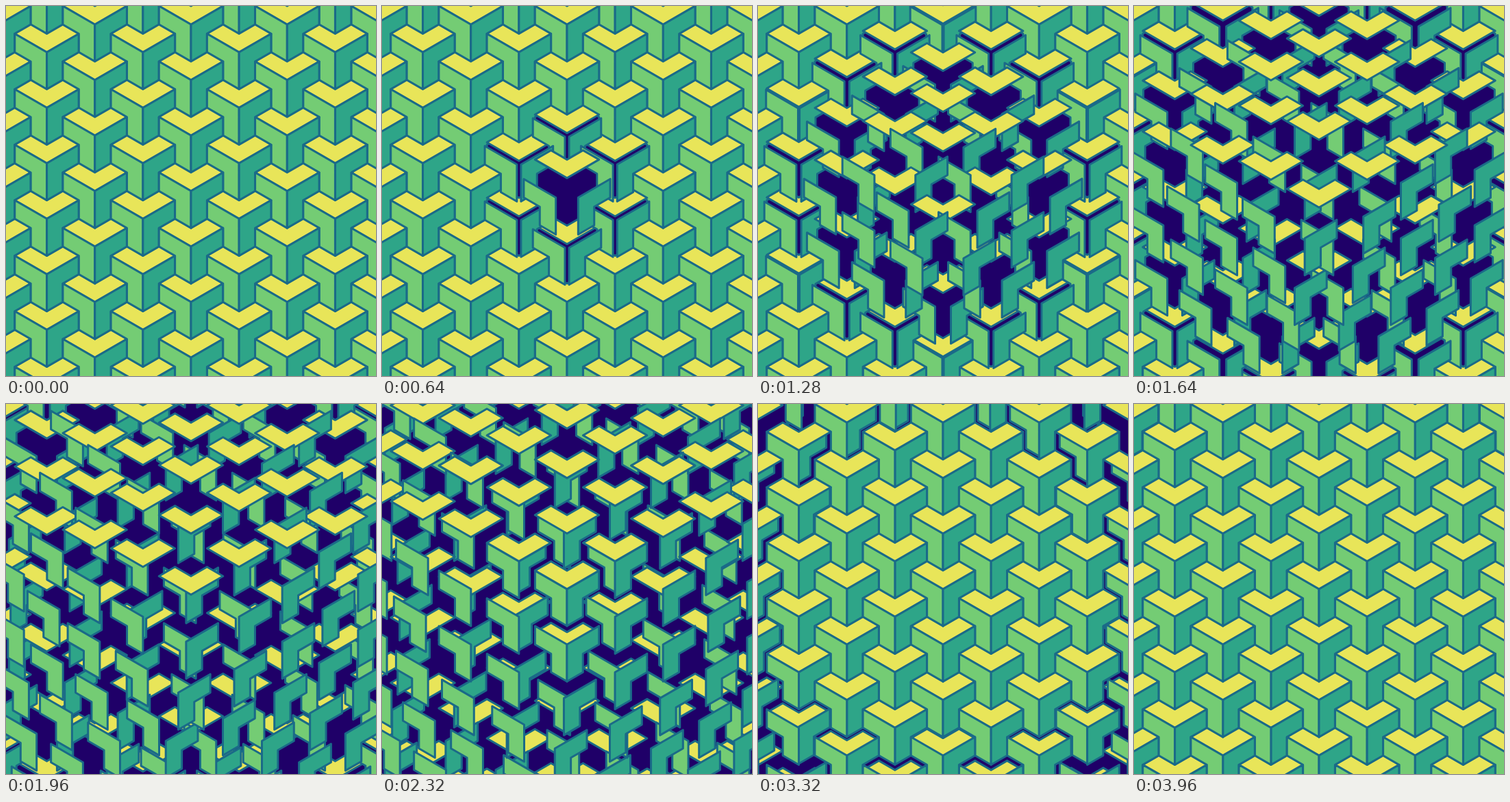
Animation, 540 px wide and 540 px high, one loop 4000 ms. Source, as an HTML page with a canvas:

```html
<!DOCTYPE html>
<html lang="en">
<head>
<meta charset="utf-8">
<title>Exploding cubes</title>
<style>
  html, body { margin: 0; width: 100%; height: 100%; overflow: hidden; background: #1f0068; }
  canvas { display: block; }
</style>
</head>
<body>
<canvas id="stage" width="540" height="540"></canvas>
<script>
const ctx = document.getElementById('stage').getContext('2d');
const LOOP = 4000, TRAVEL_TIME = 2000;
const UNIT = 27, STEP = 3 * UNIT;
const DELAY_PER_PX = 375 / STEP;
const COS30 = Math.sqrt(3) / 2;

// Each face is the same chevron, turned by thirds of a circle.
const FACES = [
  { color: '#e8e559', angle: 0 },
  { color: '#74cc74', angle: -2 * Math.PI / 3 },
  { color: '#2ea588', angle: 2 * Math.PI / 3 },
];

const chevron = new Path2D();
[[0, 0], [-2, -1], [-1, -1.5], [0, -1], [1, -1.5], [2, -1]].forEach(([x, y]) =>
  chevron.lineTo(x * COS30 * UNIT, y * UNIT));
chevron.closePath();

const pieces = [];
for (let col = -6; col <= 6; col++) {
  for (let row = -11; row <= 11; row++) {
    if ((col + row) % 2) continue;
    const x = col * STEP * COS30, y = row * STEP / 2;
    const distance = Math.hypot(x, y);
    FACES.forEach((face, type) => {
      const isTop = type === 0;
      const layer = isTop ? row - 2 : row + type * 0.1;
      const sink = isTop && row >= 3 ? 40 : 0;
      pieces.push({ x, y, face, delay: distance * DELAY_PER_PX, depth: distance + sink - layer * 0.1 });
    });
  }
}
pieces.sort((a, b) => b.depth - a.depth);

function ease(p) {
  const c = Math.min(1, Math.max(0, p));
  return (1 - Math.cos(Math.PI * c)) / 2;
}

function draw(time) {
  ctx.setTransform(1, 0, 0, 1, 0, 0);
  ctx.fillStyle = '#1f0068';
  ctx.fillRect(0, 0, 540, 540);
  ctx.strokeStyle = '#1a6a88';
  ctx.lineWidth = 3;
  ctx.lineJoin = 'round';
  for (const { x, y, face, delay } of pieces) {
    ctx.setTransform(1, 0, 0, 1, 270 + x, 270 + y);
    ctx.rotate(face.angle);
    ctx.translate(0, -STEP * ease((time - delay) / TRAVEL_TIME));
    ctx.fillStyle = face.color;
    ctx.fill(chevron);
    ctx.stroke(chevron);
  }
}

const start = performance.now();
function tick() {
  draw((performance.now() - start) % LOOP);
  requestAnimationFrame(tick);
}
tick();
</script>
</body>
</html>
```
